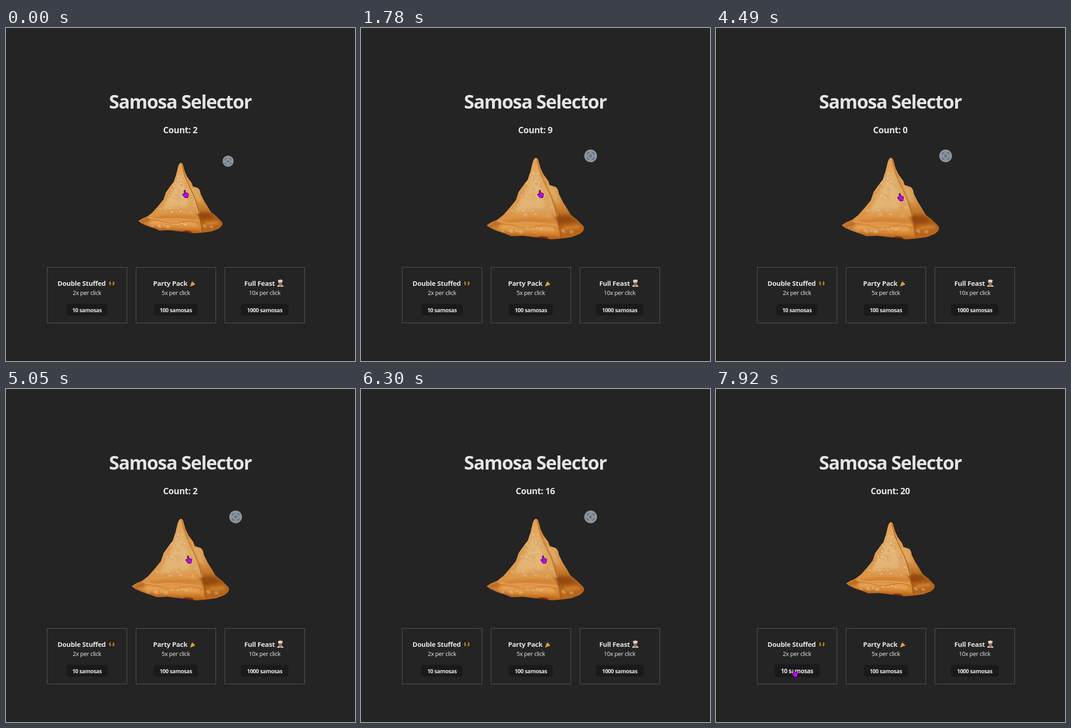
An HTML page that plays this animation: 766x731 px, repeating every 8 s.

```html
<!DOCTYPE html>
<html lang="en">
<head>
<meta charset="utf-8">
<title>Samosa Selector</title>
<style>
  html, body { margin: 0; width: 100%; height: 100%; overflow: hidden; background: #242424; }
  svg { display: block; width: 766px; height: 731px; }
  text { font-family: "Open Sans", "Noto Sans", sans-serif; fill: #e4e4e4; text-anchor: middle; letter-spacing: -.024em; }
  .bold { font-weight: 700; }
  .title { font-size: 41px; letter-spacing: -.0365em; }
  .count { font-size: 19.2px; }
  .name { font-size: 14.9px; }
  .rate { font-size: 12.8px; fill: #eee; }
  .price { font-size: 12.2px; font-weight: 700; letter-spacing: -.04em; }
</style>
</head>
<body>
<svg viewBox="0 0 766 731">
  <defs>
    <linearGradient id="crust" x1="0" y1="0" x2="0" y2="1">
      <stop offset="0" stop-color="#e8984a"/>
      <stop offset=".25" stop-color="#e3ae69"/>
      <stop offset=".55" stop-color="#dca763"/>
      <stop offset=".75" stop-color="#dd9445"/>
      <stop offset=".88" stop-color="#dc8c3a"/>
      <stop offset="1" stop-color="#c06a1c"/>
    </linearGradient>
    <linearGradient id="side" x1="0" y1="0" x2="0" y2="1">
      <stop offset="0" stop-color="#e08c3a"/>
      <stop offset=".4" stop-color="#dc9c50"/>
      <stop offset=".6" stop-color="#cd8436"/>
      <stop offset=".76" stop-color="#aa5a14"/>
      <stop offset=".86" stop-color="#b76419"/>
      <stop offset="1" stop-color="#b8671c"/>
    </linearGradient>
    <clipPath id="shape">
      <path d="M384 285Q389 286 390 294L394 308 400 321 411 336 414 345 427 349Q433 353 434 364L443 382 453 398 460 410 474 421 488 435Q491 440 487 446L480 452 462 459 440 462 418 464 400 461 380 459 355 456 330 457 318 452 300 446 284 439 276 433 285 427 299 421 312 411 327 394 340 378 346 360 356 346 366 333 372 315 377 294Q380 285 384 285Z"/>
    </clipPath>
    <filter id="soft" x="-30%" y="-30%" width="160%" height="160%"><feGaussianBlur stdDeviation="3"/></filter>
    <filter id="fine"><feGaussianBlur stdDeviation=".8"/></filter>
  </defs>

  <rect y="729" width="766" height="2" fill="#202020"/>
  <text class="bold title" x="382.5" y="177">Samosa Selector</text>
  <text class="bold count" id="count" x="382.5" y="230.5"></text>

  <g id="samosa">
    <g clip-path="url(#shape)">
      <rect x="270" y="280" width="225" height="188" fill="url(#crust)"/>
      <path d="M386 284Q393 322 408 350T430 412L440 468H500V280Z" fill="url(#side)"/>
      <g filter="url(#soft)">
        <path d="M380 312L356 362 338 404 372 400 402 396 398 356Z" fill="#e6bd80" opacity=".65"/>
        <path d="M378 292L366 333 346 360 327 394 299 421 318 420 346 384 366 350Z" fill="#dc8d3c" opacity=".55"/>
        <path d="M318 422Q370 412 424 420L428 429Q370 427 306 432Z" fill="#cc7a2a" opacity=".65"/>
        <path d="M422 410L458 412 470 424 434 431Z" fill="#924709" opacity=".85"/>
        <path d="M406 344L424 352 438 388 420 378Z" fill="#e0ae68" opacity=".75"/>
        <path d="M276 436Q320 453 375 455T440 461V468H276Z" fill="#a8560f" opacity=".65"/>
        <path d="M276 434L300 420 308 432 290 440Z" fill="#a95a18" opacity=".7"/>
        <path d="M306 438Q350 432 424 443" fill="none" stroke="#e9a655" stroke-width="8"/>
        <path d="M446 440L480 436" stroke="#cf8534" stroke-width="7"/>
      </g>
      <g id="bubbles" filter="url(#fine)"></g>
      <g fill="none" filter="url(#fine)">
        <path d="M386 288Q393 322 408 350T430 412L439 462" stroke="#9a5012" stroke-width="1.6" opacity=".85"/>
        <path d="M384 290Q390 324 404 351T425 408" stroke="#e8a956" stroke-width="2"/>
        <path d="M282 431Q310 426 337 434T390 435 430 441" stroke="#c57428" stroke-width="1.5"/>
        <path d="M298 423Q322 431 345 428T428 433" stroke="#efbd77" stroke-width="1.6" opacity=".8"/>
      </g>
      <path d="M387 460L395 457 409 459 412 464 395 464Z" fill="#8b2608"/>
    </g>
    <g id="lens" transform="translate(504 280.7)">
      <circle r="14" fill="#929292"/>
      <g fill="none" stroke="#2467ab" stroke-width="1.5">
        <path d="M-7 -2.5V-5Q-7 -7 -5 -7H-2.5M2.5 -7H5Q7 -7 7 -5V-2.5M7 2.5V5Q7 7 5 7H2.5M-2.5 7H-5Q-7 7 -7 5V2.5"/>
        <circle r="2"/>
      </g>
    </g>
  </g>

  <g id="cards"></g>

  <g transform="translate(224 552)" stroke="#151515" stroke-width="1.2" fill="#ab7a30">
    <path id="dancer" d="M2.5 1L4 3.5 5.5 1 6.500 4 6.200 7 8 9 7 11 6.300 15.500H4.700L4.500 12 3 15.500H1.500L2.500 10 .5 7.500 .5 4.500 2 6.500 2.300 4Z"/>
    <use href="#dancer" transform="translate(16.5) scale(-1 1)"/>
  </g>
  <g transform="translate(403 552)">
    <path d="M5 3L15 1 17 9 12 12Z" fill="#151515"/>
    <path d="M1 15.500L5 4.500Q10 6 12 11.500Z" fill="#e8a83a"/>
    <path d="M3 10L6 13.500M5 6L9 12" stroke="#b86f20"/>
    <path d="M7 4L8 1M10 6Q10 3 13 3M12 9Q14 7 16 9" stroke="#2f6f94" fill="none"/>
    <circle cx="14" cy="5.500" r="1" fill="#a53b35"/>
  </g>
  <g transform="translate(594 552)">
    <path d="M4 8Q3 14 5 13H11Q13 14 12 8Z" fill="#35211a"/>
    <path d="M1 16Q1 12 6 12H10Q15 12 15 16Z" fill="#cfc4c0"/>
    <ellipse cx="8" cy="8.800" rx="3.500" ry="4.200" fill="#a36a48"/>
    <path d="M4 7L3 3Q3 0 6 1Q8 -1 10 1Q14 0 13 3L12 7Q8 5.500 4 7Z" fill="#d8d2ce"/>
    <path d="M6 12.500L8 14.500 10 12.500" fill="none" stroke="#b94b48" stroke-width="1.400"/>
  </g>

  <g id="cursor" fill="#c400ff" stroke="#100014" stroke-linejoin="round">
    <path id="hand" d="M4 2Q5.500 -.5 7 2V6.500L11.500 7.500Q13.800 8.200 13.500 10.500L12 17.500H5.500L.7 11.500Q-.2 9 2 9L4 10.800Z"/>
    <path id="arrow" d="M.5 .5V14.500L3.800 11.500 6 16.500 8.200 15.500 6 10.700H10.500Z"/>
  </g>
</svg>

<script>
const LOOP = 8000;
const HOVER = 1.1, PRESS = .95, REST = 1;
const $ = id => document.getElementById(id);

// time, count, samosa scale
const clicks = [
  [0, 2, PRESS], [120, 3, HOVER], [260, 3, PRESS], [390, 4, HOVER],
  [810, 4, PRESS], [970, 5, HOVER], [1130, 6, HOVER], [1290, 6, PRESS],
  [1460, 7, HOVER], [1620, 8, PRESS], [1780, 9, HOVER],
  [2050, 9, PRESS], [2170, 10, HOVER], [2580, 10, REST], [3800, 0, REST],
  [4490, 0, HOVER], [4780, 0, PRESS], [4920, 2, HOVER], [5060, 2, PRESS],
  [5190, 4, HOVER], [5330, 6, HOVER], [5470, 6, PRESS], [5600, 8, PRESS],
  [5750, 10, HOVER], [5880, 12, HOVER], [6020, 12, PRESS], [6160, 14, HOVER],
  [6300, 16, HOVER], [6430, 16, PRESS], [6570, 18, HOVER], [6700, 20, HOVER],
  [7260, 20, REST]
];

// time, cursor x, cursor y
const moves = [
  [0, 387, 355], [2580, 345, 480], [2710, 290, 525], [2840, 235, 570],
  [2970, 190, 608], [3100, 177, 617], [3800, 177, 616], [4200, 215, 575],
  [4340, 300, 490], [4490, 398, 362], [4780, 394, 365], [7260, 330, 490],
  [7390, 240, 565], [7520, 150, 640], [7660, 76, 668], [7790, 118, 645],
  [7920, 166, 615]
];

// card left, name centre, button width, texts
const cards = [
  [90, 166, 91, "Double Stuffed", 2, 10],
  [285, 360.5, 97, "Party Pack", 5, 100],
  [480, 556.5, 105, "Full Feast", 10, 1000]
];
$("cards").innerHTML = cards.map(([x, nameX, w, name, rate, price], i) => {
  const mid = x + 87.7;
  return `<rect x="${x + .5}" y="525.5" width="175" height="122" fill="none" stroke="#5a5a5a"/>
    <text class="bold name" x="${nameX}" y="566">${name}</text>
    <text class="rate" x="${mid}" y="586">${rate}x per click</text>
    <g id="button${i}">
      <rect x="${mid - w / 2}" y="605.5" width="${w}" height="26" rx="6.4" fill="#1a1a1a"/>
      <text class="price" x="${mid}" y="623.5">${price} samosas</text>
    </g>`;
}).join("");

// Blistered crust
let seed = 11;
const random = () => (seed = seed * 16807 % 2147483647) / 2147483647;
const blister = (x, y, r) =>
  `<ellipse cx="${x}" cy="${y}" rx="${r}" ry="${r * .8}" fill="#edc68a" fill-opacity=".45" stroke="#b5712c" stroke-opacity=".5"/>`;
let spots = "";
for (let i = 0; i < 40; i++) {
  const y = 318 + random() * 95;
  spots += blister(383 + (random() - .55) * (y - 285) * .8, y, 2 + random() * 4);
}
for (let i = 0; i < 16; i++) {
  spots += blister(292 + random() * 185, 437 + random() * 15, 2 + random() * 4);
}
$("bubbles").innerHTML = spots;

const at = (rows, t) => rows.filter(row => row[0] <= t).pop();
const zoom = (el, x, y, s) =>
  el.setAttribute("transform", `translate(${x} ${y}) scale(${s}) translate(${-x} ${-y})`);
const show = (el, on) => el.style.display = on ? "" : "none";

function draw(now) {
  const t = now % LOOP;
  const [, count, scale] = at(clicks, t);
  const [, x, y] = at(moves, t);
  const overButton = x > 127 && x < 218 && y > 605 && y < 631;
  const hand = scale !== REST || overButton;

  $("count").textContent = "Count: " + count;
  zoom($("samosa"), 383, 366, scale / HOVER);
  show($("lens"), scale !== REST);
  zoom($("button0"), 177.7, 618.5, overButton ? 1.1 : 1);
  $("cursor").setAttribute("transform", `translate(${x} ${y})`);
  show($("hand"), hand);
  show($("arrow"), !hand);
  requestAnimationFrame(draw);
}
draw(0);
</script>
</body>
</html>
```
